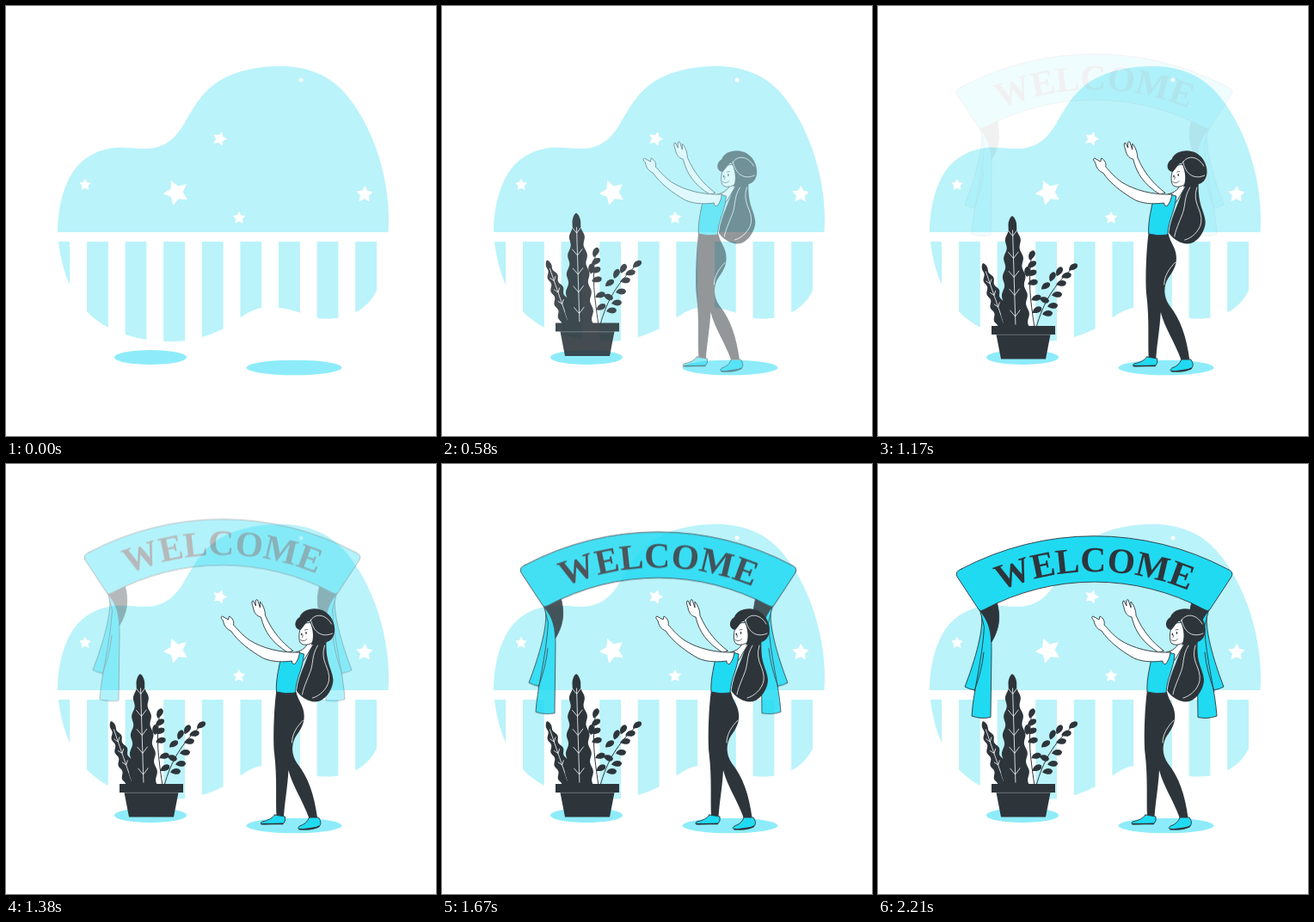
Write an HTML page that moves like this. It is 500x500 px and loops after 2.25 s.

```html
<!DOCTYPE html>
<html lang="en">
<head>
<meta charset="utf-8">
<title>Welcome</title>
<style>
html, body { margin: 0; width: 100%; height: 100%; overflow: hidden; background: #fff; }
svg { display: block; width: 100%; height: 100%; }
.pale { fill: #baf3fa; }
.floor { fill: #8eecfa; }
.dark { fill: #2d353b; }
.cyan { fill: #20daf2; }
.white { fill: #fff; }
.ink { stroke: #2d353b; stroke-width: .9; stroke-linejoin: round; stroke-linecap: round; }
.vein { fill: none; stroke: #fff; stroke-width: .8; stroke-linecap: round; }
.stem { fill: none; stroke: #2d353b; stroke-width: 1; }
.line { fill: none; }
text { font: bold 41.5px "Liberation Serif", "Times New Roman", serif; }
</style>
</head>
<body>
<svg viewBox="0 0 500 500">
  <defs>
    <clipPath id="fence"><path d="M61 274C64 300 72 330 94 355C115 378 150 388 183 390C215 391 235 384 253 375C270 366 280 354 297 351C320 347 340 357 362 363C395 366 418 356 431 331V274Z"/></clipPath>
    <path id="baseline" d="M110 163A283 283 0 0 1 393 163"/>
    <g id="tail" class="ink">
      <path class="cyan" d="M120 173C124 190 113 228 101 259Q106 262 113 263L128 200Z"/>
      <path class="cyan" d="M119 171C130 182 132 198 132 216L131 294.500Q120 297 109 293C111 262 121 230 123.500 190Z"/>
      <path class="line" d="M123 219Q121 240 112 264"/>
      <path class="dark" d="M118 170L138 160C143 178 141 192 132 207C132 192 127 180 118 170Z"/>
    </g>
  </defs>

  <path class="pale" d="M60 263C60 238 66 205 84 185C98 170 118 164 135 164.500C150 165 158 167 172 165C188 162 198 152 207 137C220 115 228 100 248 87C270 74 295 70 320 70C348 70 374 79 393 100C427 138 449 205 444.500 263Z"/>
  <g id="rails" class="pale" clip-path="url(#fence)"></g>
  <g id="stars" class="white"><circle cx="343" cy="86" r="2.500"/></g>
  <ellipse class="floor" cx="168" cy="408.500" rx="42" ry="8.500"/>
  <ellipse class="floor" cx="335" cy="420.500" rx="55.500" ry="8.800"/>

  <g id="plant">
    <path class="stem" d="M182 374C177 340 174 320 179 288M184 374C192 345 204 325 228 303"/>
    <g id="leaves" class="dark"></g>
    <path class="dark" d="M132 372H206V382H200.500L195 410.500H143L137.500 382H132Z"/>
    <path class="vein" style="stroke-width:.3" d="M138 382.300H200"/>
  </g>

  <g id="banner">
    <use href="#tail"/>
    <use href="#tail" transform="translate(503)scale(-1 1)"/>
    <path class="cyan ink" d="M97 122A331 331 0 0 1 406 122Q414 125 411 131L386 169Q384 172 380 169.500A271 271 0 0 0 123 169.500Q119 172 117 169L92 131Q89 125 97 122Z"/>
    <text class="dark" text-anchor="middle"><textPath href="#baseline" startOffset="50%">WELCOME</textPath></text>
  </g>

  <g id="woman">
    <path class="dark" d="M354 207C351 226 339 242 336.500 264C343 273 353 278 362 276C372 273 379 260 379 251C378 238 370 232 371 206Z"/>
    <path class="vein" d="M361 211C353 224 357 232 351 245C347 255 344 262 343 268M369 211C363 230 376 236 374 252C372 262 363 270 355 272"/>
    <path class="white ink" d="M332 217C320 208 308 195 300 176C300 170 297 163 294 160L294 167L291 158Q288 156 289 165L286 159Q283 159 286 167C287 173 290 177 295 178C299 195 308 208 326 219Z"/>
    <path class="dark" d="M313 263C310 285 309 320 310.500 336C314 365 312 390 313 409L321.500 410C323 390 326 375 327 356C332 375 343 390 351 412L360.500 411C357 385 350 364 337 348C330 338 330 325 336 316C343 306 346 300 345 290C344 280 338 275 336 265Z"/>
    <path class="vein" d="M344 298C337 305 331 314 331 324"/>
    <path class="cyan ink" d="M311 408L323 410Q324 416 321 418L298 419Q293 419 296 416Q307 414 311 408Z"/>
    <path class="cyan ink" d="M351 411L362 411Q367 418 362 422L341 425Q336 424 340 421Q349 418 351 411Z"/>
    <path class="stem" style="stroke-width:1.600" d="M295 418.500L321 418.500M339 424.500Q355 426 363 421"/>
    <path class="white ink" d="M349 205L348 211Q344 217 335 219L332 234L345 228L357 208Z"/>
    <path class="cyan ink" d="M319 219C317 235 312 248 313 265Q324 268 335 266C336 248 344 238 345 221L338 219L334 230Z"/>
    <path class="white ink" d="M340 219C318 220 296 214 282 205C273 199 267 191 263 187C264 183 262 179 258 177L257 181L250 177Q247 178 251 182C252 188 255 192 260 194C268 206 282 217 298 226C310 231 323 230 331 229Q330 232 334 233Q339 228 340 219Z"/>
    <path class="white ink" d="M342 186C339 196 338 206 342 209C347 212 354 209 358 205L357 184Z"/>
    <path class="dark" d="M341 193C333 192 333 182 340 178C343 168 360 165 370 172C382 180 385 200 374 206C366 210 358 208 353 211C357 203 356 193 352 184C349 180 347 187 341 193Z"/>
    <path class="vein" d="M352 183C358 172 371 175 377 186M353 181C356 197 367 202 378 197"/>
    <ellipse class="dark" cx="342.300" cy="198" rx=".8" ry="1.400"/>
    <ellipse class="dark" cx="347.500" cy="196.500" rx=".8" ry="1.400"/>
    <path class="line ink" style="stroke-width:.7" d="M341 204.500Q345 207.500 348.500 203.500M343.700 199L343 201.500M346 193L349 192.500"/>
  </g>
</svg>
<script>
const $ = id => document.getElementById(id);
const add = (id, markup) => $(id).insertAdjacentHTML('beforeend', markup);

for (let i = 0; i < 9; i++) add('rails', `<rect x="${49.400 + 44.600 * i}" y="274" width="24.800" height="120"/>`);

function star(x, y, r, turn) {
  const pts = [];
  for (let i = 0; i < 10; i++) {
    const a = (turn - 90 + i * 36) * Math.PI / 180, d = i % 2 ? r * .5 : r;
    pts.push([x + d * Math.cos(a), y + d * Math.sin(a)]);
  }
  add('stars', `<polygon points="${pts.join(' ')}" stroke="#fff" stroke-linejoin="round"/>`);
}
[[92, 208, 6.500, 0], [248.500, 154.500, 8, 18], [198, 217, 14.500, -22], [271, 246.500, 7, 0], [417, 219, 9.500, 2]]
  .forEach(s => star(...s));

// Long leaf with wavy edges, its midrib and paired side veins
function wavyLeaf(x0, y0, x1, y1, width, power, waves, veins) {
  const dx = x1 - x0, dy = y1 - y0, len = Math.hypot(dx, dy), nx = -dy / len, ny = dx / len;
  const at = (u, d) => [x0 + dx * u + nx * d, y0 + dy * u + ny * d];
  const left = [], right = [];
  for (let i = 0; i <= 60; i++) {
    const u = i / 60, ripple = 1.400 * Math.min(1, u * 6) * Math.sin(u * waves * 2 * Math.PI);
    const w = width * u ** power;
    left.push(at(u, w + ripple));
    right.unshift(at(u, -w - ripple));
  }
  let d = `M${at(.13, 0)}L${at(.97, 0)}`;
  for (const u of veins) d += `M${at(u - .055, width * .36)}L${at(u, 0)}L${at(u - .055, -width * .36)}`;
  add('leaves', `<polygon points="${left.concat(right).join(' ')}"/><path class="vein" d="${d}"/>`);
}
wavyLeaf(122, 299, 148, 374, 9, .45, 5, [.32, .5, .68]);
wavyLeaf(156, 244, 160, 374, 16, .48, 6, [.18, .38, .55, .71, .9]);

const sprig = (tilt, pts) => pts.forEach(([x, y, turn = 0]) =>
  add('leaves', `<path transform="translate(${x} ${y})rotate(${tilt + turn})" d="M-6 0C-3 -5 4 -5 6 -1C6 3 1 5 -6 0Z"/>`));
sprig(-65, [[179, 290], [179, 301, 30], [174, 309, -20], [179, 311, 40], [180, 322, 50], [184, 340, 45], [185, 354, 35]]);
sprig(-35, [[227, 304], [211, 309, -25], [219, 314, 20], [203, 315, -30], [213, 323, 25], [195, 326, 0],
  [208, 336, 30], [193, 342, 55], [203, 349, 30], [197, 358, 30]]);

// y of cubic-bezier(.36, -.01, .5, 1.38) at x
function ease(x) {
  if (x <= 0) return 0;
  if (x >= 1) return 1;
  const curve = (s, a, b) => 3 * (1 - s) ** 2 * s * a + 3 * (1 - s) * s * s * b + s ** 3;
  let lo = 0, hi = 1;
  for (let i = 0; i < 24; i++) {
    const mid = (lo + hi) / 2;
    if (curve(mid, .36, .5) < x) lo = mid; else hi = mid;
  }
  return curve(lo, -.01, 1.380);
}

function slide(id, p, dx, dy) {
  const off = -30 * (1 - p);
  $(id).setAttribute('transform', `translate(${off * dx} ${off * dy})`);
  $(id).setAttribute('opacity', Math.max(0, Math.min(1, p)));
}

const LOOP = 2250, STEP = 1000 / 24;
const start = performance.now();
function draw() {
  const t = (performance.now() - start) % LOOP;
  const step = Math.min(53, Math.floor((t + 5) / STEP));
  const time = step < 3 ? 0 : step * STEP;
  slide('plant', ease(time / 1000), 0, 1);
  slide('woman', ease(time / 1500), 1, 0);
  slide('banner', ease((time - 1000) / 1200), 0, 1);
  requestAnimationFrame(draw);
}
draw();
</script>
</body>
</html>
```
